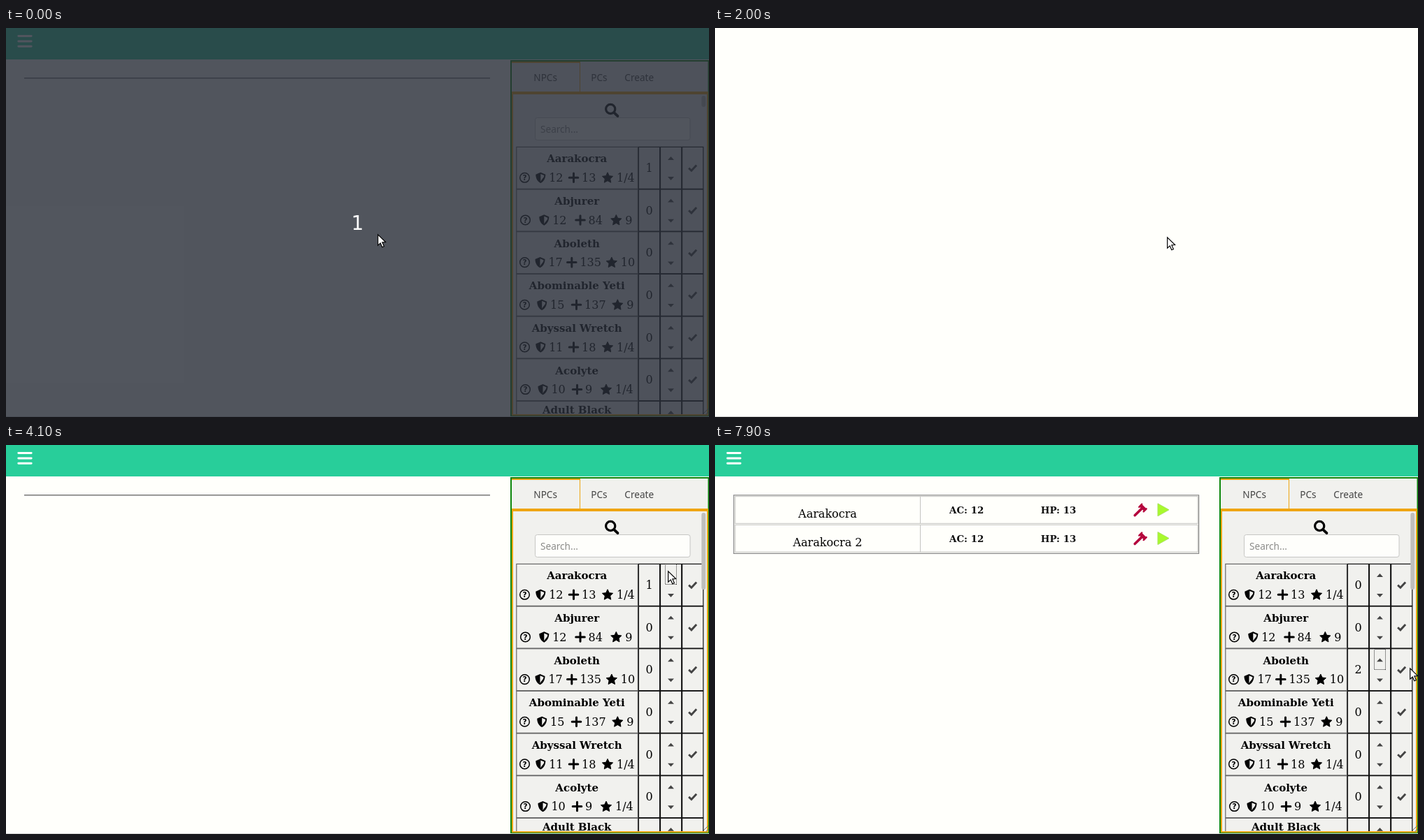
Write an HTML page that moves like this. It is 1005x557 px and loops after 8 s.

```html
<!DOCTYPE html>
<html lang="en">
<head>
<meta charset="utf-8">
<title>Encounter builder</title>
<style>
  html, body { margin: 0; width: 100%; height: 100%; overflow: hidden; background: #fffffb; }
  svg { display: block; }
  text { white-space: pre; }
  .ui { font: 13.6px "Noto Sans", sans-serif; fill: #444; }
  .serif { font: 16px "DejaVu Serif", serif; }
  .name { font: bold 15px "DejaVu Serif", serif; }
  .stat { font: bold 13.4px "DejaVu Serif", serif; fill: #111; }
  .mid { text-anchor: middle; }
  .crisp { shape-rendering: crispEdges; }
</style>
</head>
<body>
<svg width="1005" height="557" viewBox="0 0 1005 557">
  <defs>
    <clipPath id="view"><rect x="725" y="95" width="277" height="458"/></clipPath>
    <linearGradient id="teal" gradientUnits="userSpaceOnUse" x1="874" y1="0" x2="903" y2="0">
      <stop offset="0.25" stop-color="#22ae96"/><stop offset="1" stop-color="#4c8cae"/>
    </linearGradient>
    <g id="help">
      <circle r="6.8" fill="none" stroke="#000" stroke-width="1.5"/>
      <text class="mid" y="3.8" font-family="DejaVu Sans, sans-serif" font-size="10.5" font-weight="bold">?</text>
    </g>
    <path id="shield" fill-rule="evenodd"
      d="M0-7.6L7-4.6C7 1.5 4 6 0 7.7C-4 6-7 1.5-7-4.6ZM0-5.4V5.6C3-.0 4.9.5 5-3.3Z"/>
    <path id="plus" d="M-6.3 0H6.3M0-6.3V6.3" stroke="#000" stroke-width="3" stroke-linecap="round"/>
    <path id="star" stroke="#000" stroke-linejoin="round"/>
    <path id="up" d="M-4.5 2.4L0-2.4L4.5 2.4Z" fill="#444"/>
    <path id="check" d="M-5.4.6L-1.6 4.2L5.6-3.6" fill="none" stroke="#444" stroke-width="2.9"/>
    <g id="gavel" fill="none" stroke="#b5073d" stroke-linecap="round">
      <path d="M2.2 17.6L12 8" stroke-width="3.6"/>
      <path d="M10.5 3.5L16.5 9.5" stroke-width="5" stroke-linecap="butt"/>
      <path d="M8.3 5.7L12.2 1.6M14.7 12.2L18.7 8.2" stroke-width="2.4"/>
    </g>
    <path id="play" d="M0 0L16 9L0 18Z" fill="#a8f92c" stroke="#a9e35c" stroke-linejoin="round"/>
  </defs>

  <rect width="1005" height="557" fill="#fffffb"/>
  <rect class="crisp" y="556" width="1005" height="1" fill="#d2d2d0"/>

  <g id="page">
    <rect width="1005" height="45" fill="#28ce9a"/>
    <path d="M17.8 11.5H36.2M17.8 19H36.2M17.8 26.3H36.2" stroke="#fff" stroke-width="2.9" stroke-linecap="round"/>
    <path id="rule" d="M26 71.7H692" stroke="#777" stroke-width="1.4"/>
    <g id="fighters"></g>

    <rect x="722" y="47" width="282.5" height="508" fill="#f1f1ee" stroke="#0d870d" stroke-width="2"/>
    <g class="crisp" fill="#efa512">
      <path d="M723 48H821V50H723ZM820 50H821V91H820ZM723 91H1004V95H723Z"/>
      <path d="M723 95H725V555H723ZM1002 95H1004V555H1002ZM723 553H1004V555H723Z"/>
    </g>
    <g class="ui">
      <text x="754.3" y="76">NPCs</text>
      <text x="836.3" y="76">PCs</text>
      <text x="884.3" y="76">Create</text>
    </g>
    <g fill="none" stroke="#000">
      <circle cx="864.2" cy="116" r="6.6" stroke-width="3.2"/>
      <path d="M869.5 121.3L874.5 126.2" stroke-width="3.8" stroke-linecap="round"/>
    </g>
    <rect x="756.5" y="128.5" width="221.5" height="32" rx="3" fill="#fefefb" stroke="#c6c6c4"/>
    <text class="ui" x="764" y="150" style="fill:#8c8c8a">Search...</text>
    <path d="M996 553L1004 545M1000 554L1004 550" stroke="#777"/>

    <g id="list">
      <g id="rows" clip-path="url(#view)"></g>
      <rect id="thumb" x="994.3" y="97" width="6" rx="3" fill="#bfbfbd"/>
      <rect id="focus" class="crisp" x="942.5" width="16" height="29" fill="none" stroke="#333" stroke-dasharray="1 1"/>
    </g>
    <g id="spinner" fill="none" stroke="url(#teal)">
      <path id="arc" stroke-width="6.6"/>
      <path id="fringe" stroke-width="9" stroke-dasharray="1 1"/>
    </g>
  </g>

  <g id="dim">
    <rect width="1005" height="557" fill="rgb(41,46,57)" fill-opacity=".81"/>
    <text class="mid" x="502.5" y="289" font-family="DejaVu Sans, sans-serif" font-size="27.5" fill="#fff">1</text>
  </g>
  <path id="cursor" d="M.7.9V16.2L4.3 12.9L6.8 18.7L9.4 17.6L6.9 11.9L11.6 11.6Z" fill="#fff" stroke="#000" stroke-width="1.2"/>
</svg>

<script>
const $ = id => document.getElementById(id);
const show = (id, on) => $(id).style.display = on ? "" : "none";
const use = (id, x, y, more = "") => `<use href="#${id}" transform="translate(${x} ${y}) ${more}"/>`;
const text = (cls, x, y, s) => `<text class="${cls}" x="${x}" y="${y}">${s}</text>`;
const box = (x, y, w, h, color) =>
  `<rect x="${x}" y="${y}" width="${w}" height="${h}" fill="none" stroke="${color}" stroke-width="1.2"/>`;
const polar = (r, a) => [r * Math.cos(a), r * Math.sin(a)];

$("star").setAttribute("d", "M" + Array.from({ length: 10 }, (_, i) =>
  polar(i % 2 ? 3.9 : 8, (i / 5 - 0.5) * Math.PI).map(v => v.toFixed(2))).join("L") + "Z");

// name, armour, health, rating, then the x of each icon
const creatures = [
  ["Aarakocra", 12, 13, "1/4", 741.5, 764.3, 811.5, 860],
  ["Abjurer", 12, 84, "9", 742.5, 769.3, 821, 872.3],
  ["Aboleth", 17, 135, "10", 741.5, 763.5, 808.8, 865.8],
  ["Abominable Yeti", 15, 137, "9", 741.5, 766.2, 815.5, 874.3],
  ["Abyssal Wretch", 11, 18, "1/4", 741.5, 764.3, 811.5, 860],
  ["Acolyte", 10, 9, "1/4", 742.5, 767.5, 816.5, 858]
];
const rowTop = i => 170 + 60.65 * i;

function cells(y) {
  return box(729.8, y + .4, 173.6, 60, "#666") +
    [904.4, 935.5, 966.6].map(x => box(x, y + .4, 30.2, 60, "#111")).join("") +
    use("up", 950.5, y + 16.5) + use("up", 950.5, y + 45.5, "scale(1 -1)") + use("check", 981.5, y + 30);
}

function row([name, ac, hp, cr, help, shield, plus, star], i) {
  const y = rowTop(i), mid = y + 44.3, base = y + 50;
  return cells(y) + text("name mid", 816.2, y + 22.3, name) +
    use("help", help, mid) + use("shield", shield, mid) + use("plus", plus, mid) + use("star", star, mid + .5) +
    text("serif", shield + 11.9, base, ac) + text("serif", plus + 11.6, base, hp) + text("serif", star + 13, base, cr) +
    `<text class="serif mid" id="count${i}" x="919.6" y="${y + 36}">0</text>`;
}

$("rows").innerHTML = creatures.map(row).join("") + cells(rowTop(6)) +
  text("name mid", 816.2, rowTop(6) + 18.4, "Adult Black");

const fighter = (name, y) =>
  box(28.8, y, 661.4, 38.8, "#cdcdca") +
  `<path d="M293.5 ${y}v38.8" stroke="#c4c4c1"/>` +
  text("serif mid", 161, y + 30.2, name) + text("stat", 335, y + 24.6, "AC: 12") + text("stat", 465.8, y + 24.6, "HP: 13") +
  use("gavel", 598, y + 9.5) + use("play", 633, y + 10.2);

$("fighters").innerHTML = box(26.8, 71.8, 664.8, 83.6, "#888") +
  fighter("Aarakocra", 73.6) + fighter("Aarakocra 2", 114.4);

const [ax, ay] = polar(18.5, -2.05), [bx, by] = polar(18.5, -.62);
for (const id of ["arc", "fringe"])
  $(id).setAttribute("d", `M${884 + ax} ${322 + ay}A18.5 18.5 0 0 1 ${884 + bx} ${322 + by}`);

// pointer: time, x, y (it leaves the stage at the right edge now and then)
const moves = [
  [0, 531, 295], [1100, 612, 298], [1200, 646, 299],
  [3200, 732, 239], [3300, 830, 220], [3400, 930, 190], [3500, 977, 176], [3600, 960, 183], [3700, 948, 186],
  [3900, 947, 183], [4100, 946, 180], [4300, 948, 179],
  [4600, 991, 214], [4700, 1010, 212], [4900, 995, 202], [5000, 1010, 202], [5200, 994, 202],
  [5700, 992, 202], [5800, 990, 201], [5900, 989, 200], [6000, 988, 201],
  [6400, 962, 280], [6500, 925, 331],
  [6800, 912, 326], [6900, 898, 316], [7000, 914, 310], [7100, 930, 306], [7200, 941, 305], [7300, 946, 307],
  [7700, 943, 298], [7900, 993, 319]
];
const first = [[0, 1], [2000, 0], [4000, 1], [4500, 2], [6300, 0]];
const third = [[0, 0], [7500, 1], [7700, 2]];
const at = (keys, t) => keys.filter(k => k[0] <= t).pop();
const within = (t, a, b) => t >= a && t < b;

function draw(t) {
  const loading = within(t, 2400, 2700), done = t >= 6300;
  const [, x, y] = at(moves, t);
  $("cursor").setAttribute("transform", `translate(${x} ${y})`);
  show("dim", t < 500);
  show("page", !within(t, 2000, 2400));
  show("list", !loading);
  show("spinner", loading);
  $("spinner").setAttribute("transform", `rotate(${Math.floor((t - 2400) / 100) * 70} 884 322)`);
  show("rule", !done);
  show("fighters", done);
  $("count0").textContent = at(first, t)[1];
  $("count2").textContent = at(third, t)[1];
  $("thumb").setAttribute("height", t < 2000 ? 16 : 110);
  show("focus", within(t, 1700, 1800) || within(t, 4000, 6300) || t >= 7500);
  $("focus").setAttribute("y", t >= 7500 ? 292.5 : 170.5);
}

const start = performance.now();
function tick() {
  draw((performance.now() - start) % 8000);
  requestAnimationFrame(tick);
}
tick();
</script>
</body>
</html>
```
